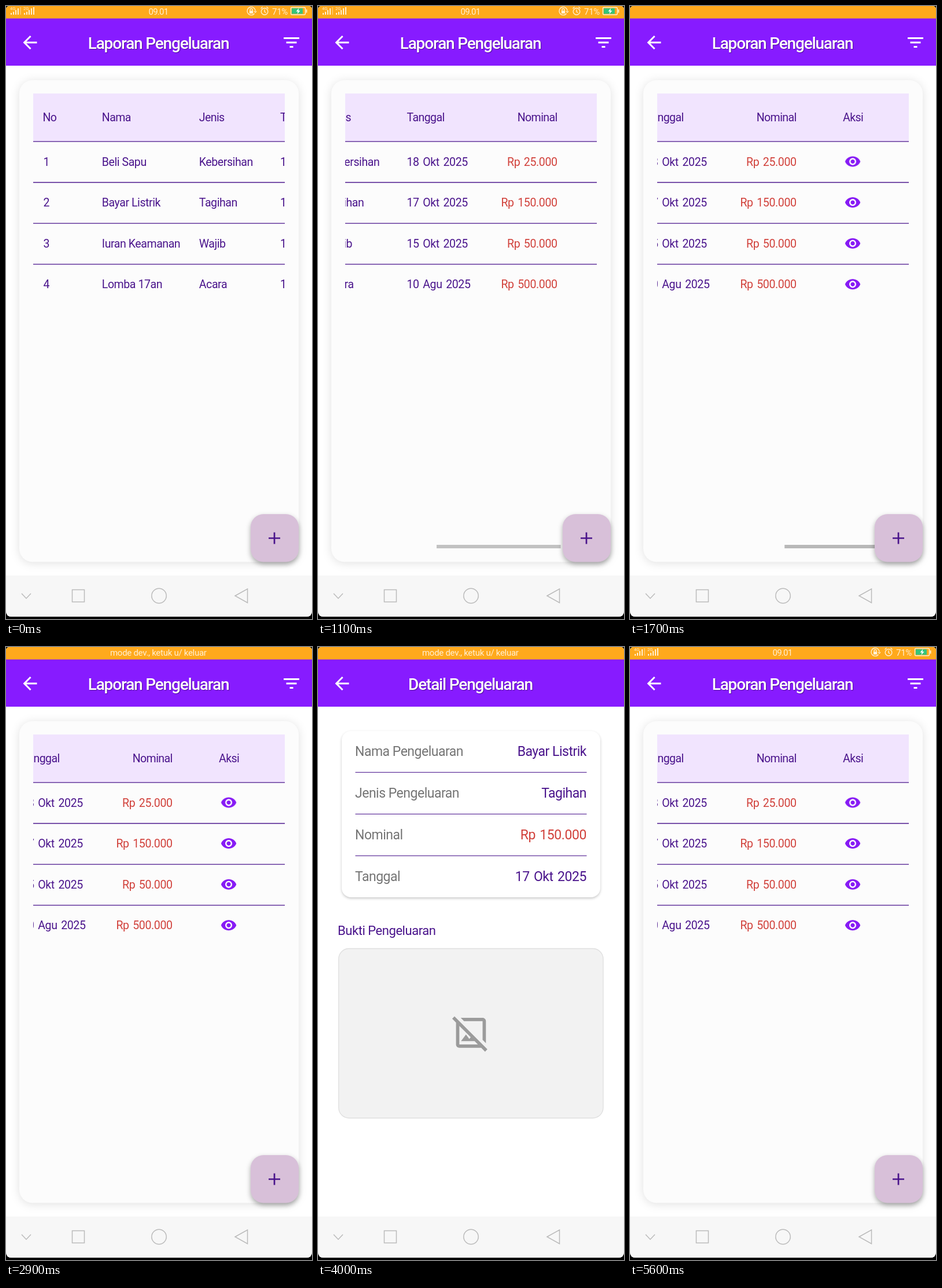
An HTML page that plays this animation: 529 px wide and 1058 px high, repeating every 5.7 s.

```html
<!DOCTYPE html>
<html lang="id">
<head>
<meta charset="utf-8">
<title>Laporan Pengeluaran</title>
<style>
  @property --scroll { syntax: "<number>"; inherits: true; initial-value: 0; }
  html, body { margin: 0; width: 100%; height: 100%; overflow: hidden; background: #000; }
  svg { display: block; }
  #stage { width: 100vw; height: 100vh; }
  text { font-family: Roboto, "Noto Sans", sans-serif; white-space: pre; }

  .cell { font-size: 19.5px; letter-spacing: -.42px; fill: #4a148c; }
  .head { letter-spacing: -.58px; }
  .num { letter-spacing: -.34px; word-spacing: 2px; }
  .label { font-size: 23px; letter-spacing: -.5px; fill: #757575; }
  .value { font-size: 23px; letter-spacing: -.5px; fill: #4a148c; }
  .value.num { letter-spacing: -.42px; }
  .cell.red, .value.red { fill: #d1403a; }
  .end { text-anchor: end; }
  .title { font-size: 28px; font-weight: 500; letter-spacing: -1.2px; text-anchor: middle; fill: #fff; text-shadow: 1px 1px 1px rgba(0, 0, 0, .4); }
  .section { font-size: 22px; letter-spacing: -.45px; fill: #4a148c; }
  .rule { stroke: #4a148c; stroke-width: 1.3; }
  .line { fill: none; stroke: #bbb; stroke-width: 1.5; }
  .small { fill: #fff0d2; font-size: 15px; letter-spacing: -.28px; }
  .card { filter: drop-shadow(0 2px 8px rgba(0, 0, 0, .12)); }
  .sheet { filter: drop-shadow(0 2px 2px rgba(0, 0, 0, .22)); }
  .fab { filter: drop-shadow(0 4px 4px rgba(0, 0, 0, .33)); }

  #list, #thumb, #icons, #ticker, #detail, #ripple, #scroller {
    animation: 5.7s step-end infinite;
  }
  #scroller { animation-name: scroll; }
  #columns { transform: translateX(calc(var(--scroll) * -1px)); }
  #thumb { transform: translateX(calc(var(--scroll) * .4932px)); animation-name: thumb; }
  #list { transform-origin: 264.5px 529px; animation-name: settle; }
  #icons { animation-name: icons; }
  #ticker { animation-name: ticker; }
  #detail { animation-name: detail; }
  #ripple { animation-name: ripple; }

  @keyframes scroll {
    0% { --scroll: 0; }
    14% { --scroll: 24; }
    15.78% { --scroll: 112; }
    17.53% { --scroll: 228; }
    19.28% { --scroll: 320.5; }
    21.04% { --scroll: 377; }
    22.8% { --scroll: 416; }
    24.55% { --scroll: 440; }
    26.3%, 100% { --scroll: 446.5; }
  }
  @keyframes thumb {
    0% { opacity: 0; }
    14% { opacity: .2; }
    15.78% { opacity: .4; }
    17.53% { opacity: .65; }
    19.28% { opacity: .85; }
    21.04% { opacity: 1; }
    35.06% { opacity: .7; }
    36.82% { opacity: .3; }
    38.57%, 100% { opacity: 0; }
  }
  @keyframes icons {
    0% { opacity: 1; }
    26.3% { opacity: .4; }
    28.05% { opacity: 0; }
    92.97% { opacity: .3; }
    94.72% { opacity: .6; }
    96.48% { opacity: .9; }
    98.23%, 100% { opacity: 1; }
  }
  @keyframes ticker {
    0% { opacity: 0; }
    33.3% { opacity: .5; }
    35.06% { opacity: 1; }
    80.68% { opacity: .5; }
    82.44%, 100% { opacity: 0; }
  }
  @keyframes detail {
    0% { visibility: hidden; }
    52.61% { visibility: visible; }
    80.68%, 100% { visibility: hidden; }
  }
  @keyframes settle {
    0% { transform: scale(1); }
    80.68% { transform: scale(1.05); }
    82.44% { transform: scale(1.014); }
    84.19% { transform: scale(1.002); }
    85.95%, 100% { transform: scale(1); }
  }
  @keyframes ripple {
    0% { opacity: 0; }
    80.68% { opacity: 1; }
    85.95% { opacity: .5; }
    87.7%, 100% { opacity: 0; }
  }
</style>
</head>
<body>
<svg id="stage" viewBox="0 0 529 1058">
  <defs>
    <clipPath id="screen"><path d="M0 6Q0 0 6 0H523Q529 0 529 6V1044Q529 1054 519 1054H10Q0 1054 0 1044Z"/></clipPath>
    <path id="back" fill="#fff" transform="translate(23.5 45) scale(1.5)" d="M20 11H7.83l5.59-5.59L12 4l-8 8 8 8 1.41-1.41L7.83 13H20z"/>
    <path id="eye" fill="#871bf5" transform="scale(1.2) translate(-12 -12)" d="M12 4.5C7 4.5 2.73 7.61 1 12c1.73 4.39 6 7.5 11 7.5s9.27-3.11 11-7.5c-1.73-4.39-6-7.5-11-7.5zM12 17c-2.76 0-5-2.24-5-5s2.24-5 5-5 5 2.24 5 5-2.24 5-5 5zm0-8c-1.66 0-3 1.34-3 3s1.34 3 3 3 3-1.34 3-3-1.34-3-3-3z"/>
  </defs>

  <g clip-path="url(#screen)">
    <rect width="529" height="1058" fill="#fff"/>

    <g id="list">
      <rect y="20" width="529" height="83" fill="#871bff"/>
      <use href="#back"/>
      <text class="title" x="263.5" y="74">Laporan Pengeluaran</text>
      <path fill="#fff" transform="translate(475.5 45) scale(1.5)" d="M10 18h4v-2h-4zM3 6v2h18V6zM6 13h12v-2H6z"/>
      <rect class="card" x="23" y="128" width="483" height="831.5" rx="23" fill="#fcfcfc"/>
      <rect x="47" y="151" width="435" height="82.5" fill="#f1e4fe"/>
      <path class="rule" d="M47 233.9H482M47 304.5H482M47 375.1H482M47 445.7H482"/>
      <g id="scroller">
        <svg x="47" y="151" width="435" height="400" viewBox="47 151 435 400">
          <g id="columns"></g>
        </svg>
        <rect id="thumb" x="47" y="930" width="214.5" height="6" fill="#b8b8b8"/>
      </g>
      <rect class="fab" x="423" y="877" width="83" height="82.5" rx="22" fill="#d8c0d9"/>
      <path d="M454 918.5H474M464 908.5V928.5" stroke="#4a148c" stroke-width="2.7"/>
    </g>

    <g id="detail">
      <rect width="529" height="983" fill="#fff"/>
      <rect y="20" width="529" height="83" fill="#871bff"/>
      <use href="#back"/>
      <text class="title" x="263.5" y="74">Detail Pengeluaran</text>
      <rect class="sheet" x="41" y="145" width="447" height="287" rx="16" fill="#fff"/>
      <path class="rule" opacity=".85" d="M64.5 216.3H464.5M64.5 288.3H464.5M64.5 360.3H464.5"/>
      <g id="fields"></g>
      <text class="section" x="34" y="497">Bukti Pengeluaran</text>
      <rect x="35.7" y="520.5" width="457.3" height="292.5" rx="18" fill="#f2f2f2" stroke="#dfdfdf" stroke-width="1.3"/>
      <path fill="#9b9b9b" transform="translate(230 631.5) scale(2.87)" d="M5.83 3l2 2H19v11.17l2 2V5c0-1.1-.9-2-2-2zM2.1 2.1.69 3.51 3 5.83V19c0 1.1.9 2 2 2h13.17l2.31 2.31 1.41-1.41zM5 19V7.83l6.84 6.84-.84 1.05L9 13l-3 4h8.17l2 2z"/>
    </g>

    <rect width="529" height="21.5" fill="#ffa91c"/>
    <text id="ticker" class="small" x="180" y="15">mode dev., ketuk u/ keluar</text>
    <g id="icons" fill="#fff0d2">
      <text x="7" y="7" font-size="7.5">4G</text>
      <path d="M8 15V12h2v3zM12 15V10h2v5zM16 15V7h2v8zM20 15V4h2v11z"/>
      <path d="M24.5 2h1.2v13h-1.2z" opacity=".6"/>
      <text x="30" y="7" font-size="7.5">2G</text>
      <path d="M31 15V12h2v3zM35 15V10h2v5zM39 15V7h2v8zM43 15V4h2v11zM47 15V2h2v13z"/>
      <text class="small" x="246.5" y="15" style="letter-spacing:-.75px">09.01</text>
      <g fill="none" stroke="#fff0d2" stroke-width="1.4">
        <path d="M429.5 13A7 7 0 1 1 431 8.5M429 9l2 2 2-2"/>
        <path d="M422 8.5V6.5a2 2 0 0 1 4 0V8.5"/>
        <circle cx="447" cy="9.5" r="5.8"/>
        <path d="M447 6V10l2.5 1.5M440.5 4.5l3-3M453.5 4.5l-3-3"/>
        <rect x="492.5" y="2.5" width="25" height="12.5" rx="2"/>
      </g>
      <rect x="420.8" y="8" width="6.4" height="5"/>
      <text class="small" x="460" y="14.5">71%</text>
      <rect x="494" y="4" width="19" height="9.5" fill="#35c47b"/>
      <path d="M506.5 3.5l-5 6h3l-1 4.5 5-6h-3z" fill="#fff"/>
      <rect x="518.5" y="6" width="2" height="5.5"/>
    </g>

    <rect y="983" width="529" height="71" fill="#f7f7f7"/>
    <path class="line" d="M27 1014l8 8.5 8-8.5M114.5 1007.5h21v21h-21zM396 1018l21.5-12v24z"/>
    <circle class="line" cx="264.5" cy="1018" r="12.7"/>
  </g>
</svg>

<script>
  const text = (cls, x, y, content) => `<text class="${cls}" x="${x}" y="${y}">${content}</text>`;

  const expenses = [
    ["Beli Sapu", "Kebersihan", "18 Okt 2025", "Rp 25.000"],
    ["Bayar Listrik", "Tagihan", "17 Okt 2025", "Rp 150.000"],
    ["Iuran Keamanan", "Wajib", "15 Okt 2025", "Rp 50.000"],
    ["Lomba 17an", "Acara", "10 Agu 2025", "Rp 500.000"],
  ];
  const columnX = { no: 63.5, name: 165.8, kind: 333.8, date: 474, amount: 734.2, action: 814.5, eye: 831.5 };

  const header = [
    ["no", "No"], ["name", "Nama"], ["kind", "Jenis"],
    ["date", "Tanggal"], ["amount", "Nominal"], ["action", "Aksi"],
  ].map(([key, label]) => text(`cell head ${key === "amount" ? "end" : ""}`, columnX[key], 199, label)).join("");

  const rows = expenses.map(([name, kind, date, amount], i) => {
    const y = 275.5 + i * 70.6;
    return text("cell num", columnX.no + 1, y, i + 1)
      + text("cell", columnX.name, y, name)
      + text("cell", columnX.kind, y, kind)
      + text("cell num", columnX.date, y, date)
      + text("cell num red end", columnX.amount, y, amount)
      + `<use href="#eye" transform="translate(${columnX.eye} ${y - 7})"/>`;
  }).join("");

  const ripple = `<circle id="ripple" cx="${columnX.eye}" cy="339" r="29.5" fill="#ece6f2"/>`;
  document.getElementById("columns").innerHTML = ripple + header + rows;

  const [name, kind, date, amount] = expenses[1];
  document.getElementById("fields").innerHTML = [
    ["Nama Pengeluaran", name, ""],
    ["Jenis Pengeluaran", kind, ""],
    ["Nominal", amount, "num red"],
    ["Tanggal", date, "num"],
  ].map(([label, value, cls], i) => {
    const y = 188 + i * 72;
    return text("label", 64, y, label) + text(`value end ${cls}`, 464, y, value);
  }).join("");
</script>
</body>
</html>
```
